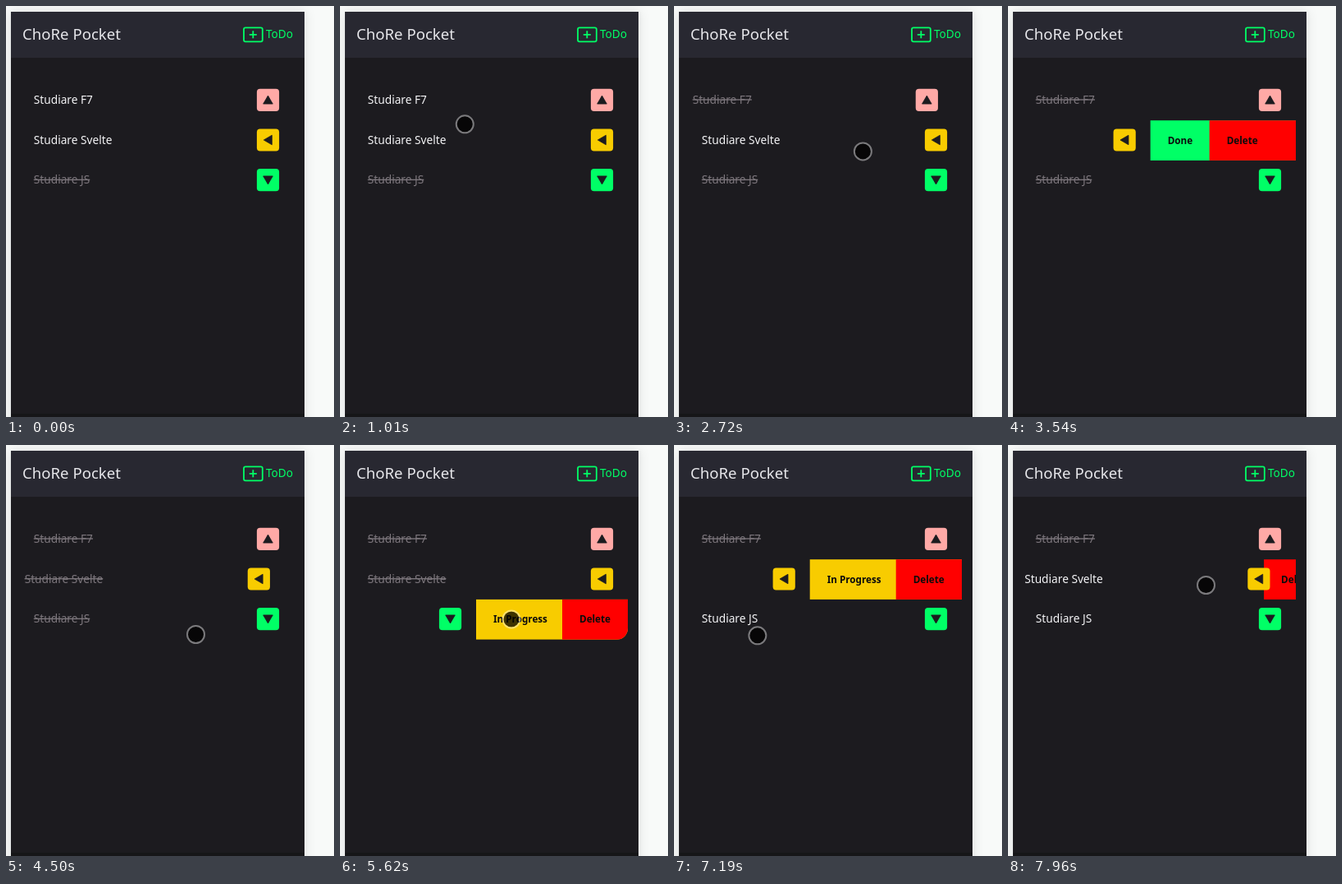
Animation, 400 px wide and 500 px high, one loop 8000 ms. Source, as an HTML page:

```html
<!DOCTYPE html>
<html lang="it">
<head>
<meta charset="utf-8">
<style>
  html, body { margin: 0; width: 100%; height: 100%; overflow: hidden; background: #f8faf9; }
  svg { display: block; width: 400px; height: 500px; font-family: "Noto Sans", "Open Sans", sans-serif; }
  .device { filter: drop-shadow(0 0 7px rgba(0, 0, 0, .12)); }
  .title { font-size: 18.6px; fill: #e6e6ea; }
  .add { font-size: 13.6px; fill: #00ff66; }
  .task { font-size: 13.7px; fill: #f4f4f6; }
  .task.done { fill: #7c767c; text-decoration: line-through; }
  .action { font-size: 11.7px; font-weight: 600; fill: #0c0c0c; }
</style>
</head>
<body>
<svg viewBox="0 0 400 500">
  <defs>
    <clipPath id="card"><rect x="20" y="90.5" width="331" height="146.5" rx="14"/></clipPath>
  </defs>
  <rect class="device" x="6" y="7" width="358" height="510" fill="#1c1b1f"/>
  <rect x="6" y="7" width="358" height="56" fill="#282831"/>
  <rect x="6" y="496" width="358" height="4" fill="#161618"/>
  <text class="title" x="20" y="41">ChoRe Pocket</text>
  <g fill="none" stroke="#00ff66" stroke-width="1.8">
    <rect x="290" y="26.3" width="22.8" height="17" rx="2"/>
    <path d="M296.8 34.8h9M301.3 30.3v9"/>
  </g>
  <text class="add" x="317" y="39.3">ToDo</text>
  <g id="list" clip-path="url(#card)"></g>
  <g id="cursor">
    <circle r="9.6" fill="#000" fill-opacity=".75"/>
    <circle r="10.5" fill="none" stroke="#fff" stroke-opacity=".42" stroke-width="2"/>
  </g>
</svg>
<script>
const LOOP = 8000, RIGHT = 351, ROW = 48.7, TOP = 90.5;
const DELETE_WIDTH = 80, SETTLE = 300, RETURN = 500, BULGE = .12;
const DONE = { label: "Done", width: 72, color: "#00ff66" };
const PROGRESS = { label: "In Progress", width: 105, color: "#f8cc00" };

const tasks = [
  { text: "Studiare F7", color: "#ffa9a6", turn: 0, done: false },
  { text: "Studiare Svelte", color: "#f8cc00", turn: -90, done: false },
  { text: "Studiare JS", color: "#00ff66", turn: 180, done: true },
];

// The pointer waits at `start`, pulls the row open, then taps its first action, which toggles the task.
const swipes = [
  { row: 0, ready: 1140, start: { x: 141, y: 122 }, press: 1350, pull: 268, release: 1850, tap: { x: 235, y: 115 }, close: 2520 },
  { row: 1, ready: 3200, start: { x: 213, y: 171 }, press: 3380, pull: 209, release: 3540, tap: { x: 235, y: 167 }, close: 4300 },
  { row: 2, ready: 4500, start: { x: 231.5, y: 230.5 }, press: 4760, pull: 188, release: 5000, tap: { x: 209, y: 212 }, close: 5850 },
  { row: 1, ready: 6510, start: { x: 186.5, y: 173.5 }, press: 6720, pull: 210, release: 6950, tap: { x: 241.5, y: 170.5 }, close: 7760 },
];

const legs = [];
let origin = { x: 412, y: 252 }, leave = 90;
for (const { start, ready, press, pull, release, tap, close } of swipes) {
  const pulled = { x: start.x - pull, y: start.y };
  legs.push(
    { begin: leave, end: ready, from: origin, to: start },
    { begin: press, end: release, from: start, to: pulled, straight: true },
    { begin: release, end: release + RETURN, from: pulled, to: tap },
  );
  origin = tap;
  leave = close;
}

const clamp = x => Math.min(1, Math.max(0, x));

// Free moves ease in and out and sag downwards, more so the longer they last.
function pointerAt(t) {
  const leg = legs.findLast(l => l.begin <= t);
  if (!leg) return { x: -50, y: 0 };
  const { begin, end, from, to, straight } = leg;
  const time = clamp((t - begin) / (end - begin));
  const k = straight ? time : time * time * (3 - 2 * time);
  const sag = straight ? 0 : BULGE * (end - begin) * Math.sin(Math.PI * k);
  return { x: from.x + (to.x - from.x) * k, y: from.y + (to.y - from.y) * k + sag };
}

// The CSS "ease" curve, cubic-bezier(.25, .1, .25, 1)
function ease(x) {
  const bezier = (a, b, s) => 3 * a * s * (1 - s) ** 2 + 3 * b * s * s * (1 - s) + s ** 3;
  if (x <= 0 || x >= 1) return clamp(x);
  let low = 0, high = 1;
  for (let i = 0; i < 20; i++) {
    const mid = (low + high) / 2;
    if (bezier(.25, .25, mid) < x) low = mid; else high = mid;
  }
  return bezier(.1, 1, low);
}

// Past its full width the row resists the pull.
function dragged({ press, release, pull }, t, width) {
  const delta = pull * clamp((t - press) / (release - press));
  return delta > width ? width + (delta - width) ** .8 : delta;
}

function make(tag, parent, attributes = {}, text = "") {
  const node = document.createElementNS("http://www.w3.org/2000/svg", tag);
  for (const name in attributes) node.setAttribute(name, attributes[name]);
  node.textContent = text;
  parent.append(node);
  return node;
}

function makeAction(parent, color, label) {
  const group = make("g", parent);
  const back = make("rect", group, { width: 400, height: ROW, fill: color });
  const text = make("text", group, { class: "action", x: 21, y: 28.4 }, label);
  return { group, back, text };
}

const move = (node, x, y = 0) => node.setAttribute("transform", `translate(${x} ${y})`);

const list = document.getElementById("list");
const cursor = document.getElementById("cursor");
const rows = tasks.map((task, i) => {
  const row = make("g", list);
  move(row, 0, TOP + i * ROW);
  const first = makeAction(row, DONE.color, "");
  const remove = makeAction(row, "#ff0000", "Delete");
  const content = make("g", row);
  const title = make("text", content, { x: 33.8, y: 28.5 }, task.text);
  make("rect", content, { x: 305.9, y: 10.2, width: 27.2, height: 27.2, rx: 4, fill: task.color });
  make("path", content, {
    d: "M-5.8 4.8H5.8L0 -5.2Z", fill: "#1c1b1f", stroke: "#1c1b1f", "stroke-width": .8,
    "stroke-linejoin": "round", transform: `translate(319.5 23.8) rotate(${task.turn})`,
  });
  return { first, remove, content, title };
});

function rowState(index, t) {
  let done = tasks[index].done;
  const state = { offset: 0, firstLeft: RIGHT, deleteLeft: RIGHT };
  for (const swipe of swipes) {
    if (swipe.row !== index || t < swipe.press) continue;
    const action = done ? PROGRESS : DONE;
    const width = action.width + DELETE_WIDTH;
    if (t < swipe.close) {
      let offset = dragged(swipe, t, width);
      offset += (width - offset) * ease((t - swipe.release) / SETTLE);
      state.offset = offset;
      state.firstLeft = RIGHT - offset;
      state.deleteLeft = RIGHT - offset + action.width * Math.min(offset / width, 1);
    } else {
      // Swapping the first action shifts the delete button by the difference in width.
      done = !done;
      const left = 1 - ease((t - swipe.close) / SETTLE);
      const shift = (done ? PROGRESS : DONE).width - action.width;
      state.offset = width * left;
      state.firstLeft = RIGHT;
      state.deleteLeft = left > 0 ? RIGHT - DELETE_WIDTH * left + shift : RIGHT;
    }
  }
  return { ...state, done };
}

function draw(now) {
  const t = now % LOOP;
  rows.forEach((row, i) => {
    const { offset, firstLeft, deleteLeft, done } = rowState(i, t);
    const action = done ? PROGRESS : DONE;
    row.first.back.setAttribute("fill", action.color);
    row.first.text.textContent = action.label;
    move(row.first.group, firstLeft);
    move(row.remove.group, deleteLeft);
    move(row.content, -offset);
    row.title.setAttribute("class", done ? "task done" : "task");
  });
  const { x, y } = pointerAt(t);
  cursor.style.display = x < 6 ? "none" : "";
  move(cursor, x, y);
}

const start = performance.now();
function tick() {
  draw(performance.now() - start);
  requestAnimationFrame(tick);
}
tick();
</script>
</body>
</html>
```
